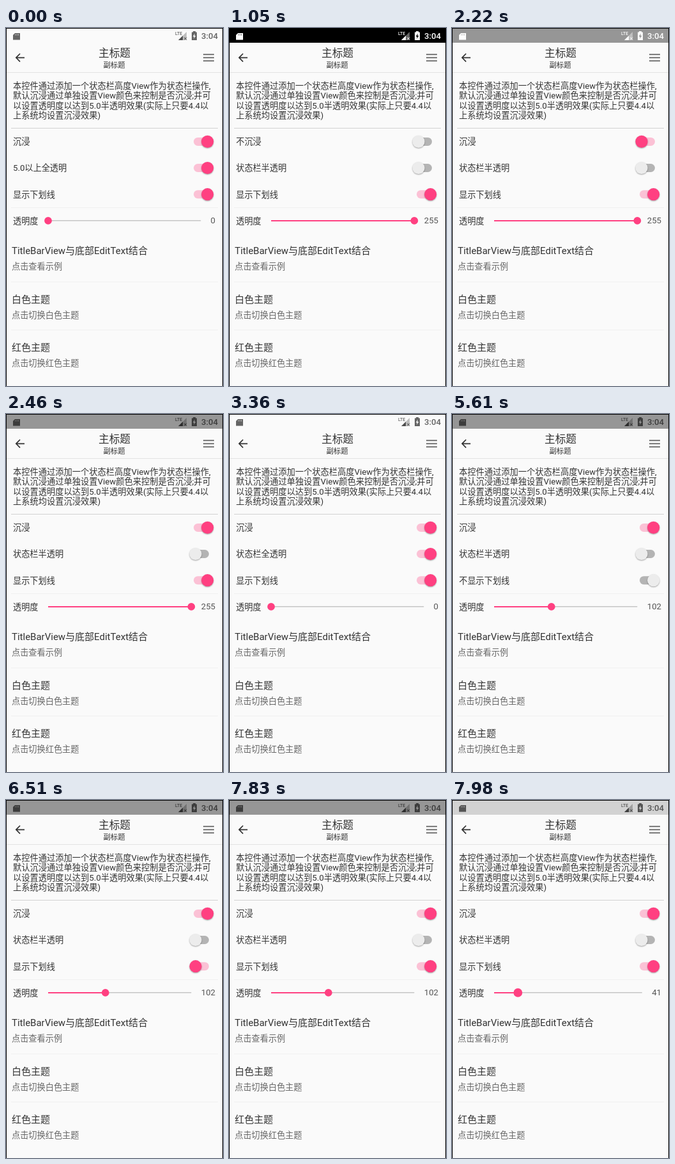
These frames come from a looping animation (340 px wide and 559 px high, 8 s). An HTML page with a canvas:

```html
<!DOCTYPE html>
<html lang="zh-CN">
<head>
<meta charset="utf-8">
<style>
html, body { margin: 0; width: 100%; height: 100%; overflow: hidden; background: #fafafa; }
canvas { display: block; }
</style>
</head>
<body>
<canvas id="stage" width="340" height="559"></canvas>
<script>
const ctx = document.getElementById('stage').getContext('2d');
const LOOP = 8000, PINK = '#ff4081', PAGE = '#fafafa', FAINT = '#f0f0f0';
const FONT = 'Roboto, "Noto Sans CJK SC", "Noto Sans CJK", sans-serif';

const clamp = v => Math.max(0, Math.min(1, v));
const ease = v => (1 - Math.cos(Math.PI * clamp(v))) / 2;
const dragAt = t => clamp((t - 7830) / 150);

function text(str, x, y, size = 13.2, color = '#333', align = 'left', weight = 400) {
  ctx.font = `${weight} ${size}px ${FONT}`;
  ctx.fillStyle = color;
  ctx.textAlign = align;
  ctx.fillText(str, x, y);
}

function rect(x, y, w, h, color) {
  ctx.fillStyle = color;
  ctx.fillRect(x, y, w, h);
}

function disc(x, y, r, color) {
  ctx.fillStyle = color;
  ctx.beginPath();
  ctx.arc(x, y, r, 0, 2 * Math.PI);
  ctx.fill();
}

function shape(color, ...pts) {
  ctx.fillStyle = color;
  ctx.beginPath();
  for (const [x, y] of pts) ctx.lineTo(x, y);
  ctx.fill();
}

// flips: [time, duration] pairs; every switch starts on
function switchAt(t, flips) {
  let on = true, pos = 1;
  for (const [start, dur] of flips) {
    if (t < start) break;
    on = !on;
    const p = ease((t - start) / dur);
    pos = on ? p : 1 - p;
  }
  return { on, pos };
}

function drawSwitch(y, { on, pos }) {
  ctx.fillStyle = on ? 'rgba(255,64,129,.3)' : '#b4b4b4';
  ctx.beginPath();
  ctx.roundRect(294, y - 6.5, 24, 13, 6.5);
  ctx.fill();
  ctx.save();
  ctx.shadowColor = 'rgba(0,0,0,.35)';
  ctx.shadowBlur = 2;
  ctx.shadowOffsetY = 1;
  disc(297 + 18.7 * pos, y, 9.6, on ? PINK : '#ececec');
  ctx.restore();
}

function statusBar(bar, ink) {
  rect(1, 1, 338, 22, bar);
  // memory card
  shape(ink, [14, 8], [22, 8], [22, 18.5], [11, 18.5], [11, 11]);
  for (let i = 0; i < 3; i++) rect(14.5 + i * 2.3, 9.5, .7, 2, bar);
  // signal
  text('LTE', 265, 11, 6.8, ink, 'left', 500);
  ctx.globalAlpha = .4;
  shape(ink, [283, 6], [283, 19], [270, 19]);
  ctx.globalAlpha = 1;
  shape(ink, [277, 12], [277, 19], [270, 19]);
  ctx.strokeStyle = ink;
  ctx.lineWidth = 1;
  ctx.beginPath();
  ctx.moveTo(279, 14.5); ctx.lineTo(283, 18.5);
  ctx.moveTo(283, 14.5); ctx.lineTo(279, 18.5);
  ctx.stroke();
  // battery
  shape(ink, [293, 5], [297, 5], [297, 6.5], [299, 6.5], [299, 19], [291, 19], [291, 6.5], [293, 6.5]);
  shape(bar, [295.7, 8.5], [292.7, 13.5], [294.7, 13.5], [294.3, 17], [297.3, 12], [295.4, 12]);
  text('3:04', 306, 17, 13.2, ink, 'left', 500);
}

function titleBar() {
  ctx.strokeStyle = '#333';
  ctx.lineWidth = 1.7;
  ctx.beginPath();
  ctx.moveTo(29, 46.3); ctx.lineTo(16, 46.3);
  ctx.moveTo(22, 40); ctx.lineTo(15.8, 46.3); ctx.lineTo(22, 52.6);
  ctx.stroke();
  for (const y of [40.5, 45.5, 50.5]) rect(309, y, 17, 1.7, '#606060');
  text('主标题', 170, 44.8, 16.7, '#333', 'center');
  text('副标题', 169.5, 62, 11.4, '#333', 'center');
  rect(1, 69, 338, 1, '#e2e2e2');
}

function slider(value, radius) {
  const label = String(value);
  const end = 312.7 - 7.45 * label.length;
  const x = 66 + (end - 66) * value / 255;
  rect(66, 300, end - 66, 1.5, '#c6c6c6');
  rect(66, 300, x - 66, 2, PINK);
  disc(x, 300.9, radius, PINK);
  text(label, 328, 305.3, 13.2, '#555', 'right');
}

function item(y, title, hint) {
  text(title, 9, y, 15);
  text(hint, 9, y + 24, 13.2, '#666');
}

function alphaAt(t) {
  if (t < 810) return 0;
  if (t < 3150) return 255;
  if (t < 3900) return 0;
  return Math.round(102 - 61 * dragAt(t));
}

function barColor(immersed, clear, alpha) {
  if (!immersed) return '#000';
  if (clear) return PAGE;
  const g = Math.round(250 * (1 - Math.min(alpha, 102) / 255));
  return `rgb(${g},${g},${g})`;
}

function draw(t) {
  const immerse = switchAt(t, [[810, 240], [2220, 240]]);
  const clear = switchAt(t, [[810, 240], [3150, 210], [3900, 240]]);
  const line = switchAt(t, [[5610, 270], [6510, 240]]);
  const alpha = alphaAt(t);

  rect(0, 0, 340, 559, PAGE);
  const light = clamp((t - 810) / 120) - clamp((t - 2220) / 120);
  const shade = Math.round(255 * light);
  statusBar(barColor(immerse.on, clear.on, alpha),
    `rgba(${shade},${shade},${shade},${.6 + .4 * light})`);
  titleBar();

  ['本控件通过添加一个状态栏高度View作为状态栏操作,',
   '默认沉浸通过单独设置View颜色来控制是否沉浸;并可',
   '以设置透明度以达到5.0半透明效果(实际上只要4.4以',
   '上系统均设置沉浸效果)'].forEach((s, i) => text(s, 11, 94.5 + 15.5 * i, 13.25));
  rect(8, 156, 324, 1, '#d2d2d2');

  text(immerse.on ? '沉浸' : '不沉浸', 11, 182);
  text(t < 810 ? '5.0以上全透明' : clear.on ? '状态栏全透明' : '状态栏半透明', 11, 223);
  text(line.on ? '显示下划线' : '不显示下划线', 11, 264.5);
  drawSwitch(177.4, immerse);
  drawSwitch(218.5, clear);
  drawSwitch(259.7, line);
  rect(8, 280, 324, 1, FAINT);

  text('透明度', 11, 305.5);
  slider(alpha, 5.9 + dragAt(t));

  item(352.5, 'TitleBarView与底部EditText结合', '点击查看示例');
  rect(8, 396, 324, 1, FAINT);
  item(428.5, '白色主题', '点击切换白色主题');
  rect(8, 471, 324, 1, FAINT);
  item(504, '红色主题', '点击切换红色主题');

  rect(0, 0, 340, 1, '#000');
  rect(0, 0, 1, 559, '#000');
  rect(339, 0, 1, 559, '#000');
}

const begin = performance.now();
function tick() {
  draw((performance.now() - begin) % LOOP);
  requestAnimationFrame(tick);
}
tick();
</script>
</body>
</html>
```
